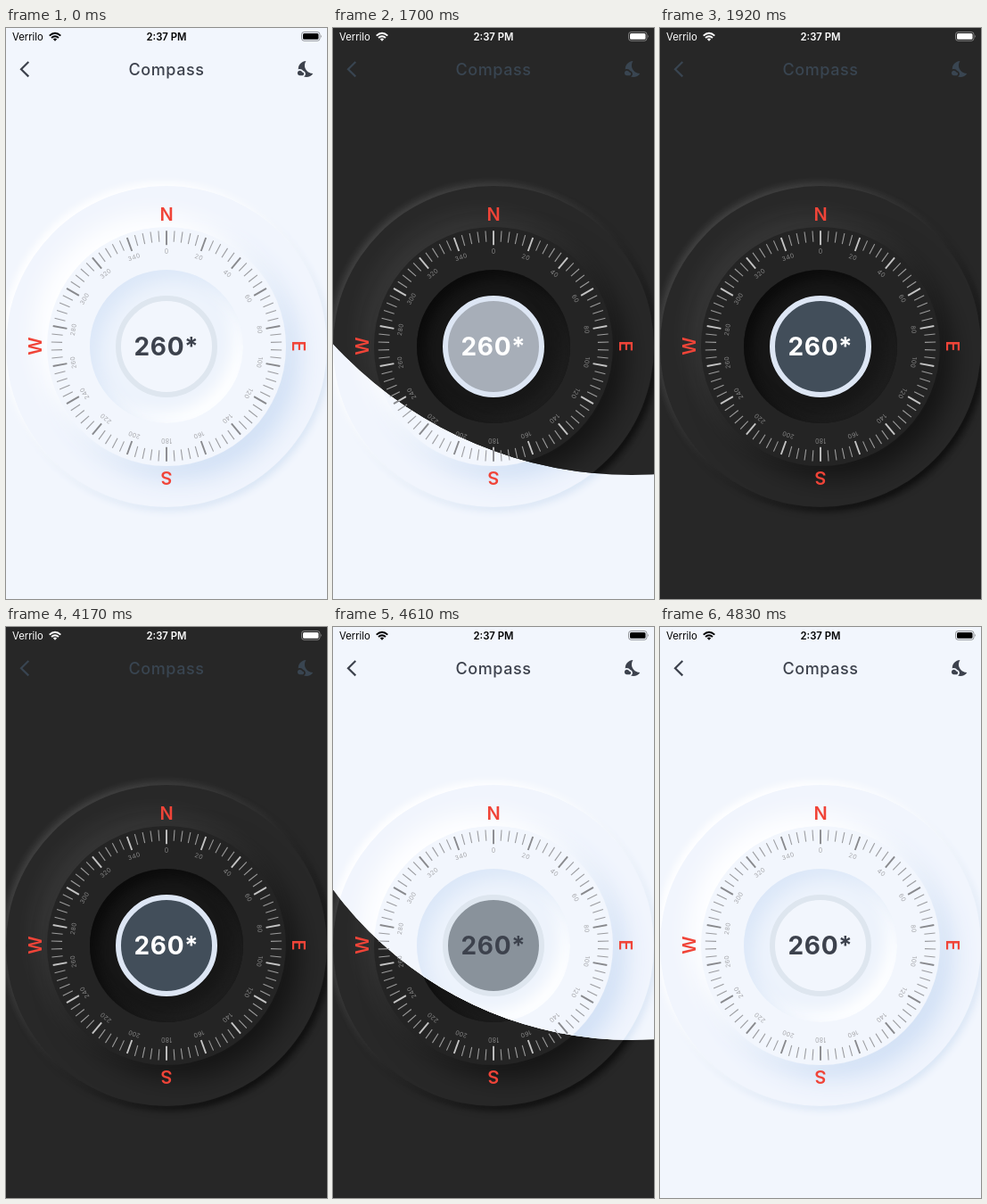
An HTML page for the animation above (4890 ms loop, 360x640 px).

```html
<!DOCTYPE html>
<html lang="en">
<head>
<meta charset="utf-8">
<title>Compass</title>
<style>
  html, body { margin: 0; width: 100%; height: 100%; overflow: hidden; }
  #stage { position: relative; width: 360px; height: 640px; overflow: hidden; }
  .screen {
    position: absolute; inset: 0; overflow: hidden;
    background: var(--bg); color: var(--ink);
    font-family: Inter, Roboto, sans-serif;
  }
  .light {
    --bg: #f2f6fd; --ink: #3d424d; --status: #000; --value: #3d424d;
    --major: #88898d; --minor: #9b9ca0; --digits: #a6a7ab; --ring: #dee6ef;
    --dial: #f1f5fd; --dial-shadow: -4px -4px 8px #fff, 3px 4px 9px #d9e5f5;
    --disc: #f2f6fd; --disc-shadow: -13px -13px 28px #fff, 14px 14px 30px #cfdff5;
    --pit: #edf3fc; --pit-shadow: inset 10px 10px 20px #dbe7f8, inset -10px -10px 18px #fff;
    z-index: 1;
    animation: show-light 4890ms step-end infinite;
  }
  .dark {
    --bg: #272727; --ink: #394551; --status: #fff; --value: #fff;
    --major: #c4c4c4; --minor: #9c9c9c; --digits: #858585; --ring: #dde6f4;
    --dial: #282828; --dial-shadow: -3px -3px 8px #ffffff26, 4px 4px 9px #000000b0;
    --disc: #242424; --disc-shadow: -12px -12px 30px #ffffff14, 14px 14px 30px #00000080;
    --pit: #171717; --pit-shadow: inset 8px 8px 16px #0a0a0a, inset -8px -8px 16px #202020;
    z-index: 2;
    animation: show-dark 4890ms step-end infinite;
  }
  .disc { position: absolute; left: 180px; top: 356.5px; border-radius: 50%; transform: translate(-50%, -50%); }
  .dial { width: 360px; height: 360px; background: var(--dial); box-shadow: var(--dial-shadow); }
  .plate { width: 268px; height: 268px; background: var(--disc); box-shadow: var(--disc-shadow); }
  .pit { width: 172px; height: 172px; background: var(--pit); box-shadow: var(--pit-shadow); }
  .core { width: 102px; height: 102px; border: 6.5px solid var(--ring); }
  .light .core { background: #f2f6fd; animation: core-light 4890ms step-end infinite; }
  .dark .core { background: #424e5a; animation: core-dark 4890ms step-end infinite; }
  .press {
    position: absolute; left: 304px; top: 15px; width: 62px; height: 62px;
    border-radius: 50%; background: #00000008; opacity: 0;
  }
  .light .press { animation: press 4890ms step-end infinite; }
  svg { position: absolute; inset: 0; }
  text { text-anchor: middle; }
  .status { fill: var(--status); font-size: 11.3px; }
  .title { fill: var(--ink); font-size: 18px; font-weight: 500; letter-spacing: .6px; }
  .value { fill: var(--value); font-size: 28px; font-weight: 700; letter-spacing: .6px; }
  .point { fill: #f04438; font-size: 20px; font-weight: 600; }
  .digits { fill: var(--digits); font-size: 7px; letter-spacing: .3px; }

  @keyframes show-dark {
    0% { clip-path: circle(0px at 335px 46px); }
    34.764% { clip-path: circle(455px at 335px 46px); }
    37.013%, 100% { clip-path: circle(900px at 335px 46px); }
  }
  @keyframes show-light {
    0% { z-index: 1; clip-path: circle(900px at 335px 46px); }
    81.8% { z-index: 3; clip-path: circle(0px at 335px 46px); }
    92.024% { z-index: 3; clip-path: circle(167px at 335px 46px); }
    94.273% { z-index: 3; clip-path: circle(417px at 335px 46px); }
    96.523% { z-index: 3; clip-path: circle(667px at 335px 46px); }
    98.772%, 100% { z-index: 3; clip-path: circle(900px at 335px 46px); }
  }
  @keyframes core-dark {
    0% { background: #f2f6fd; }
    34.764% { background: #a7aeb8; }
    37.013% { background: #6d7782; }
    39.263%, 100% { background: #424e5a; }
  }
  @keyframes core-light {
    0% { background: #f2f6fd; }
    81.8% { background: #424e5a; }
    94.273% { background: #89929b; }
    96.523% { background: #c5cbd3; }
    98.772%, 100% { background: #f2f6fd; }
  }
  @keyframes press {
    0% { opacity: 0; }
    29.856% { opacity: 1; }
    34.764%, 100% { opacity: 0; }
  }
</style>
</head>
<body>
<div id="stage"></div>
<script>
  const range = (n, fn) => Array.from({ length: n }, (_, i) => fn(i)).join('');

  // Places content on the dial at an angle, facing outwards.
  const spin = (deg, content) => `<g transform="rotate(${deg} 180 356.5)">${content}</g>`;

  const tick = i => {
    const major = i % 5 === 0;
    return spin(i * 4, `<path d="M180 227.2V${major ? 243.2 : 239.5}"
      stroke="var(--${major ? 'major' : 'minor'})" stroke-width="${major ? 1.9 : 1.1}"/>`);
  };

  const digits = i => spin(i * 20, `<text class="digits" x="180" y="252.8">${i * 20}</text>`);

  const point = (name, i) => spin(i * 90, `<text class="point" x="180" y="216">${name}</text>`);

  const statusBar = `
    <g class="status">
      <text x="7" y="14" style="text-anchor:start">Verrilo</text>
      <text x="180" y="14" font-weight="600">2:37 PM</text>
      <g fill="none" stroke="var(--status)" stroke-width="1.9">
        <path d="M48.7 8.6Q55 2.9 61.3 8.6M51 11Q55 7.4 59 11"/>
      </g>
      <path d="M52.8 12.4Q55 10.6 57.2 12.4L55 14.8Z"/>
      <rect x="331.5" y="4.5" width="20.5" height="9.8" rx="2.8" fill="none"
        stroke="var(--status)" stroke-opacity=".4"/>
      <rect x="333" y="6" width="17.5" height="6.8" rx="1.5"/>
      <path d="M353.3 7.8q1.5 1.6 0 3.2z" opacity=".5"/>
    </g>`;

  const toolbar = `
    <path d="M25.3 38L17 46.2L25.3 54.4" fill="none" stroke="var(--ink)" stroke-width="2.2"/>
    <text class="title" x="180" y="52.7">Compass</text>
    <path transform="translate(326 35.2) scale(.9)" fill="var(--ink)" d="M19.78 17.51c-2.47 0-6.57-1.33-8.68-5.43
      C8.77 7.57 10.6 3.6 11.63 2.01C6.27 2.2 1.98 6.59 1.98 12c0 .14.02.28.02.42C2.62 12.15 3.29 12 4 12
      c1.66 0 3.18.83 4.1 2.15C9.77 14.63 11 16.17 11 18c0 1.52-.87 2.83-2.12 3.51c.98.32 2.03.5 3.11.5
      c3.5 0 6.58-1.8 8.37-4.52zM7 16h-.18C6.4 14.84 5.3 14 4 14c-1.66 0-3 1.34-3 3s1.34 3 3 3h3
      c1.1 0 2-.9 2-2S8.1 16 7 16z"/>`;

  const screen = theme => `
    <div class="screen ${theme}">
      ${['dial', 'plate', 'pit', 'core'].map(c => `<div class="disc ${c}"></div>`).join('')}
      <div class="press"></div>
      <svg width="360" height="640">
        ${statusBar}${toolbar}
        ${range(90, tick)}${range(18, digits)}
        ${['N', 'E', 'S', 'W'].map(point).join('')}
        <text class="value" x="180" y="367">260*</text>
      </svg>
    </div>`;

  document.getElementById('stage').innerHTML = screen('light') + screen('dark');
</script>
</body>
</html>
```
